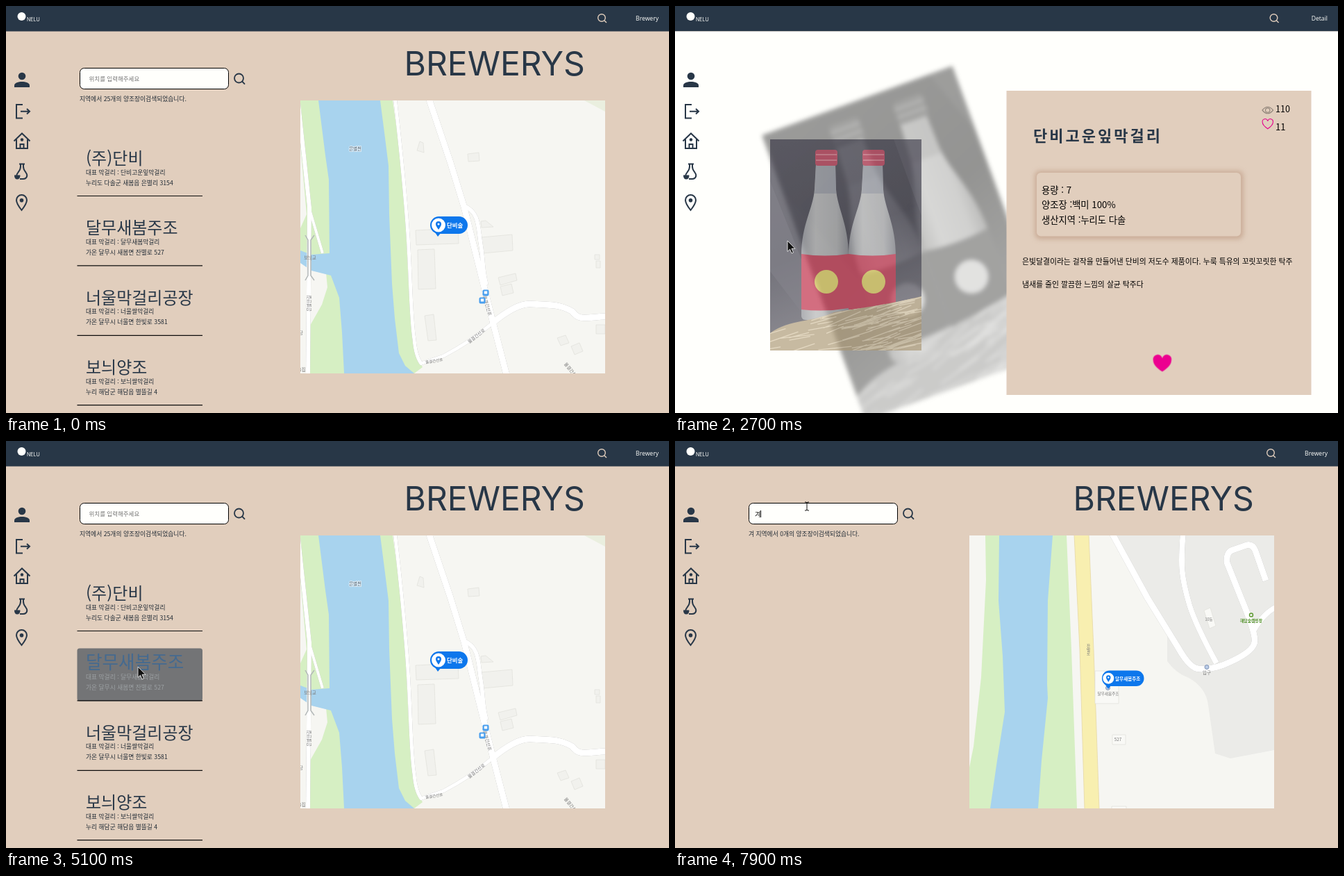
Recreate the animation shown at these times as an HTML page. Size 955 by 586 pixels, loop 8 s.

```html
<!DOCTYPE html>
<html lang="ko">
<head>
<meta charset="utf-8">
<title>Brewery</title>
<style>
@property --h { syntax: "<number>"; inherits: true; initial-value: 0; }
html, body { margin: 0; width: 100%; height: 100%; overflow: hidden; background: #e1cebd; }
svg { display: block; }
text { font-family: "Noto Sans CJK KR", "Noto Sans CJK", sans-serif; white-space: pre; }
.anim { animation: 8s step-end infinite; }
.latin { font: 8.6px "Open Sans", sans-serif; fill: #fffffc; text-anchor: end; }
.line { fill: none; stroke: #283747; stroke-width: 2; }
.small { font-size: 8.75px; fill: #222c36; }

/* cards: --h is the hover amount */
.card .bg { fill: #2b3a49; opacity: var(--h); rx: calc(6px * var(--h)); }
.card .name { font-size: calc(24px + 2.7px * var(--h)); fill: color-mix(in srgb, #568cc0 calc(var(--h) * 100%), #283747); }
.card .sub { font-size: 8.75px; fill: color-mix(in srgb, #fffffc calc(var(--h) * 92%), #222c36); }
#c1 { animation-name: hover1; }
#c2 { animation-name: hover2; }
@keyframes hover1 {
  0% { --h: 0; }
  7.5% { --h: 0; animation-timing-function: steps(4); }
  12.5% { --h: 1; }
  21.25%, 75% { --h: 0; }
  76.25% { --h: .1; animation-timing-function: steps(4); }
  81.25% { --h: 1; }
  82.5% { --h: 1; animation-timing-function: steps(5); }
  88.75%, 100% { --h: 0; }
}
@keyframes hover2 {
  0% { --h: 0; }
  60% { --h: 0; animation-timing-function: steps(5); }
  66.25%, 75% { --h: 1; }
  76.25% { --h: .88; animation-timing-function: steps(4); }
  81.25%, 100% { --h: 0; }
}

/* page states */
#list { animation-name: list; }
#map { animation-name: map; }
#map2 { animation-name: map2; }
#detail { animation-name: detail; }
.late { animation-name: late; }
#hint { animation-name: hint; }
#caret { animation-name: caret; }
#key1 { animation-name: key1; }
#key2 { animation-name: key2; }
#n1 { animation-name: n1; }
#n2 { animation-name: n2; }
#n3 { animation-name: n3; }
#n4 { animation-name: n4; }
@keyframes list { 0%, 52.5% { visibility: visible; } 46.25%, 98.75%, 100% { visibility: hidden; } }
@keyframes map { 0%, 52.5%, 100% { opacity: 1; } 46.25% { opacity: 0; } }
@keyframes map2 { 0% { visibility: hidden; } 68.75%, 100% { visibility: visible; } }
@keyframes detail { 0%, 46.25%, 100% { opacity: 0; } 21.25% { opacity: 1; } }
@keyframes late { 0% { visibility: hidden; } 23.75%, 100% { visibility: visible; } }
@keyframes hint { 0% { visibility: visible; } 92.5%, 100% { visibility: hidden; } }
@keyframes caret { 0% { visibility: hidden; } 92.5%, 100% { visibility: visible; } }
@keyframes key1 { 0%, 97.5%, 100% { visibility: hidden; } 92.5% { visibility: visible; } }
@keyframes key2 { 0% { visibility: hidden; } 97.5%, 100% { visibility: visible; } }
@keyframes n1 { 0%, 52.5% { visibility: visible; } 46.25%, 93.75%, 100% { visibility: hidden; } }
@keyframes n2 { 0%, 52.5%, 100% { visibility: hidden; } 46.25% { visibility: visible; } }
@keyframes n3 { 0%, 98.75%, 100% { visibility: hidden; } 93.75% { visibility: visible; } }
@keyframes n4 { 0% { visibility: hidden; } 98.75%, 100% { visibility: visible; } }

/* detail page */
#info { animation-name: info; }
#stats { animation-name: stats; }
#photo { animation-name: photo; }
#backdrop { filter: grayscale(1) blur(3px); opacity: .5; }
#glow { filter: blur(3px); }
@keyframes info { 0% { transform: none; } 23.75%, 100% { transform: translateY(21.5px); } }
@keyframes stats { 0% { transform: none; } 23.75%, 100% { transform: translateX(-20px); } }
@keyframes photo {
  0% { opacity: 0; transform: translateX(-60px); }
  23.75% { opacity: 0; transform: translateX(-60px); animation-timing-function: steps(8); }
  33.75% { opacity: .66; transform: translateX(-3px); animation-timing-function: steps(3); }
  37.5% { opacity: .85; transform: translateX(5px); animation-timing-function: steps(4); }
  42.5%, 100% { opacity: 1; transform: none; }
}

/* link bars and pointers */
#bar1 { animation-name: bar1; }
#bar2 { animation-name: bar2; }
#arrow { animation-name: arrow; }
#beam { animation-name: beam; }
@keyframes bar1 { 0%, 23.75%, 100% { visibility: hidden; } 15% { visibility: visible; } }
@keyframes bar2 {
  0%, 52.5%, 100% { opacity: 0; }
  41.25% { opacity: 1; }
  48.75% { opacity: .9; animation-timing-function: steps(3); }
  52.4% { opacity: .3; }
}
@keyframes arrow {
  0% { transform: translate(83px, -40px); }
  6.25% { transform: translate(83px, 28px); animation-timing-function: steps(5); }
  12.5% { transform: translate(150px, 235px); }
  15% { transform: translate(148px, 231px); animation-timing-function: steps(3); }
  18.75% { transform: translate(152px, 222px); }
  21.25% { transform: translate(157px, 297px); }
  23.75% { transform: translate(157px, 297px); animation-timing-function: steps(8); }
  33.75% { transform: translate(162px, 338px); }
  35% { transform: translate(162px, 338px); animation-timing-function: steps(5); }
  41.25% { transform: translate(66px, -22px); }
  57.5% { transform: translate(200px, 194px); animation-timing-function: steps(5); }
  63.75% { transform: translate(190px, 325px); }
  68.75% { transform: translate(188px, 326px); animation-timing-function: steps(6); }
  76.25% { transform: translate(182px, 260px); animation-timing-function: steps(2); }
  78.75% { transform: translate(182px, 250px); }
  80% { transform: translate(182px, 250px); animation-timing-function: steps(5); }
  86.25% { transform: translate(188px, 132px); }
  87.5%, 100% { transform: translate(0, -40px); }
}
@keyframes beam {
  0% { transform: translate(0, -40px); }
  87.5% { transform: translate(189px, 114px); animation-timing-function: steps(2); }
  90%, 100% { transform: translate(190px, 94px); }
}

/* maps */
.road { fill: none; stroke: #fff; filter: drop-shadow(0 0 .6px #aaa); }
.house { fill: #f1f1ed; stroke: #e0e0da; stroke-width: .7; }
.tag { font-size: 6.4px; fill: #777; text-anchor: middle; }
.pin { font-weight: 700; fill: #fff; }
</style>
</head>
<body>
<svg width="955" height="586" viewBox="0 0 955 586">
  <defs>
    <path id="heart" d="M12 21C4.500 16 1 12 1 7.300A5.600 5.600 0 0 1 12 4.800A5.600 5.600 0 0 1 23 7.300C23 12 19.500 16 12 21Z"/>
    <g id="lens" fill="none"><circle r="5.300"/><path d="M3.900 3.900L7 7"/></g>
    <g id="drop"><circle r="10" fill="#fff"/><path d="M0 6.500C-3 2-4 .5-4-1.500a4 4 0 0 1 8 0C4 .5 3 2 0 6.500Z" fill="#0d77ec"/><circle cy="-1.500" r="1.500" fill="#fff"/></g>
    <g id="bus"><rect x="-4.500" y="-4.500" width="9" height="9" rx="2" fill="#4a9fee"/><path d="M-2.200-2.500h4.400v4h-4.400Z" fill="#fff"/></g>
    <linearGradient id="cloth" x2=".3" y2="1"><stop stop-color="#3a3846"/><stop offset=".55" stop-color="#2b2a38"/><stop offset="1" stop-color="#585661"/></linearGradient>
    <linearGradient id="glass"><stop stop-color="#85878f"/><stop offset=".3" stop-color="#b0b1b2"/><stop offset=".75" stop-color="#a3a4a7"/><stop offset="1" stop-color="#777982"/></linearGradient>
    <g id="bottle">
      <path d="M-13 36L-15 72C-17 100-34 122-34 168V255Q-33 260-28 260H28Q33 260 34 255V168C34 122 18 100 16 72L15 36Z" fill="url(#glass)"/>
      <path d="M-13 36L-15 78H16L15 36Z" fill="#777c8e" opacity=".55"/>
      <rect x="-14" y="15" width="32" height="23" rx="4" fill="#b32c4a"/>
      <path d="M-13 22H17M-13 30H17" stroke="#d8798a" stroke-width="1.500"/>
      <path d="M-34 165Q0 170 34 165V243Q0 249-34 245Z" fill="#bd2440"/>
      <circle cx="2" cy="205" r="17" fill="#dccb55"/>
    </g>
    <clipPath id="pile"><path d="M0 279C30 258 60 264 92 249L150 240Q190 233 218 226V304H0Z"/></clipPath>
    <symbol id="scene" viewBox="0 0 218 304" preserveAspectRatio="xMinYMin slice">
      <rect width="218" height="304" fill="url(#cloth)"/>
      <path d="M0 60L46 175V250L0 190ZM178 0H218V110Z" fill="#4a4856" opacity=".5"/>
      <use href="#bottle" x="79"/><use href="#bottle" x="147"/>
      <g clip-path="url(#pile)"><rect width="218" height="304" fill="#ab9673"/><path id="straw" fill="none" stroke="#d6c6a5" stroke-width="1.300"/></g>
    </symbol>
  </defs>

  <rect width="955" height="586" fill="#e1cebd"/>
  <rect width="955" height="36.500" fill="#283747"/>
  <circle cx="22.500" cy="15" r="6" fill="#fffffc"/>
  <text x="30" y="22" style="font:7px Inter,sans-serif" fill="#fffffc">NELU</text>

  <g id="brewery">
    <use href="#lens" x="858" y="17" stroke="#e1cebd" stroke-width="1.400"/>
    <text class="latin" x="940" y="20.500">Brewery</text>
    <text x="573.500" y="100" style="font:48px Inter,sans-serif" fill="#283747">BREWERYS</text>
    <rect x="106.500" y="89.500" width="214" height="30" rx="6" fill="#fffffc" stroke="#000"/>
    <use href="#lens" transform="translate(335.500 104) scale(1.220)" stroke="#283747" stroke-width="1.500"/>
    <text id="hint" class="anim" x="119.500" y="108" font-size="8.500" fill="#757575">위치를 입력해주세요</text>
    <text id="key1" class="anim" x="115" y="108.500" font-size="9">ㄱ</text>
    <text id="key2" class="anim" x="115" y="108.500" font-size="9">겨</text>
    <path id="caret" class="anim" d="M123.500 100V110" stroke="#000"/>
    <text id="n1" class="anim small" x="106" y="137">지역에서 25개의 양조장이검색되었습니다.</text>
    <text id="n2" class="anim small" x="106" y="137">지역에서 0개의 양조장이검색되었습니다.</text>
    <text id="n3" class="anim small" x="106" y="137">ㄱ 지역에서 25개의 양조장이검색되었습니다.</text>
    <text id="n4" class="anim small" x="106" y="137">겨 지역에서 0개의 양조장이검색되었습니다.</text>
    <g id="list" class="anim"></g>

    <g id="map" class="anim">
      <svg x="424" y="136" width="439" height="393" viewBox="424 136 439 393">
        <rect x="424" y="136" width="439" height="393" fill="#f6f6f2"/>
        <path d="M424 136H557L566 200 575 300 580 400 585 470 592 505 600 520 588 529H438V460L455 430 463 405 461 384 424 368V320L433 300 424 200Z" fill="#d6efc3"/>
        <path d="M450 136H539L546 190 551 230 552 300 556 400 560 450 566 500 575 518 588 529H487L484 470 480 420 468 388 440 381 424 370V352L440 358 466 356 465 250 460 215Z" fill="#a8d3ee"/>
        <path d="M833 136L863 152V136Z" fill="#eaefdf"/>
        <g class="house">
          <path d="M590 323L651 320 652 342 591 344ZM593 351L617 350 619 407 594 408ZM603 446L616 444 620 481 608 482ZM665 213L681 211 682 223 666 224ZM592 208L596 195 601 197 602 211ZM685 333L729 329 730 352 687 356ZM684 310L691 309 702 318 685 319ZM709 391L734 385 736 395 712 402ZM712 404L728 400 731 413 715 417ZM848 358H855V365H848ZM850 367H856V377H850ZM794 478L806 474 811 485 799 489ZM814 490L826 485 831 497 819 502ZM850 459H863V472H850Z"/>
        </g>
        <g class="road" stroke-width="9">
          <path d="M608 130L640 225 660 290 700 450 722 535"/>
          <path d="M700 457Q735 428 755 429C785 430 800 430 816 440C826 455 840 447 866 447"/>
          <path d="M660 288C682 296 680 320 684 345S686 380 692 402" stroke-width="6"/>
          <path d="M700 457Q670 483 630 504L597 515" stroke-width="5"/>
          <path d="M560 130C568 200 575 270 579 330S583 450 588 480Q590 505 599 516" stroke-width="5"/>
          <path d="M421 140Q432 240 437 290L435 535" stroke-width="6"/>
          <path d="M437 292L456 356" stroke-width="4"/>
        </g>
        <path d="M431 330L435 337V388L431 395M444 330L439 337V388L444 395" fill="none" stroke="#b3b8b8" stroke-width="1.500"/>
        <g class="tag">
          <text x="503" y="207.500" fill="#456" stroke="#e8f4fb" stroke-width="1.500" paint-order="stroke">은별천</text>
          <text x="438" y="364.500">보늬교</text>
          <text transform="translate(438.500 428) rotate(-90)">은별안길</text>
          <text x="425" y="473">당</text><text x="427" y="526">1집</text>
          <text transform="translate(679 477) rotate(-38)">물결간선로</text>
          <text transform="translate(617 513) rotate(-9)" font-size="5.500">물결간선로</text>
          <text transform="translate(691 432) rotate(74)">물결간선로</text>
          <text transform="translate(813 527) rotate(50)">물결간선로</text>
        </g>
        <use href="#bus" x="691" y="413"/><use href="#bus" x="686" y="424"/>
        <path d="M618 326H627L622 332Z" fill="#0d77ec"/>
        <rect x="611" y="303" width="54" height="25" rx="12.500" fill="#0d77ec"/>
        <use href="#drop" x="623" y="315.500"/>
        <text class="pin" x="635" y="318.700" font-size="8.400">단비술</text>

        <g id="map2" class="anim">
          <rect x="424" y="136" width="439" height="393" fill="#f6f6f2"/>
          <path d="M447 136H564L571 300 579 529H424V470L430 440 441 340 448 200Z" fill="#d6efc3"/>
          <path d="M467 136H544L537 230 536 350 537 370 528 460 523 529H454L464 460 475 390 472 310 466 230Z" fill="#a8d3ee"/>
          <path d="M575 135H596L603 300 611 530H590L583 300Z" fill="#f8efb0" stroke="#e6d8a6" stroke-width=".8"/>
          <path d="M630 136L709 280V317Q722 335 740 341 765 355 768 380L778 450 800 457 863 445V136Z" fill="#ebebe8"/>
          <g class="road" stroke-width="9">
            <path d="M628 130L680 225 725 298Q742 328 755 328 775 330 800 318 835 302 835 288 836 275 815 225L795 175Q794 160 803 157L823 150Q832 148 836 158L851 201"/>
            <path d="M732 130C728 180 729 195 741 236Q750 265 780 320" stroke-width="8"/>
            <path d="M834 272Q848 248 866 239" stroke-width="8"/>
          </g>
          <g class="house">
            <path d="M762 244L771 240 779 266 770 270ZM605 331H639V378H605ZM630 423H649V437H630ZM629 526H650V533H629Z" fill="#f9f9f6"/>
          </g>
          <g class="tag">
            <text x="769" y="259" font-size="5.500">10동</text>
            <text x="638" y="432">527</text>
            <text x="766" y="335.500">입구</text>
            <text x="624" y="366" font-size="5.600">달무새봄주조</text>
            <text x="595.500" y="297" font-size="5.500">잔</text><text x="595.500" y="302.500" font-size="5.500">별</text><text x="595.500" y="308" font-size="5.500">로</text>
            <text x="830" y="261" font-weight="700" font-size="5.800" style="fill:#4f8f25">해담숲캠핑장</text>
          </g>
          <circle cx="830" cy="250.500" r="2.500" fill="none" stroke="#5c9a30" stroke-width="1.400"/>
          <g fill="#b9cbe6" stroke="#7f93b5"><circle cx="766" cy="325.500" r="3"/><circle cx="623.500" cy="355.500" r="3"/></g>
          <path d="M620 351H629L624 357Z" fill="#0d77ec"/>
          <rect x="615" y="330.500" width="60.500" height="22.500" rx="11" fill="#0d77ec"/>
          <use href="#drop" transform="translate(624.300 341.700) scale(.8)"/>
          <text class="pin" x="634" y="344.500" font-size="6.600">달무새봄주조</text>
        </g>
      </svg>
    </g>
  </g>

  <g id="detail" class="anim">
    <path d="M845 5H950V30H845Z" fill="#283747"/>
    <use href="#lens" x="862.500" y="17" stroke="#e1cebd" stroke-width="1.400"/>
    <text class="latin" x="940" y="20.500">Detail</text>
    <rect y="36.500" width="955" height="549.500" fill="#fffffc"/>
    <g class="anim late"><g id="backdrop"><use href="#scene" width="292" height="437" transform="translate(125 186) rotate(-20)"/></g></g>
    <g id="photo" class="anim"><use href="#scene" x="140" y="192" width="218" height="304"/></g>
    <rect x="477.500" y="122" width="439" height="438" fill="#e1cebd"/>
    <g id="stats" class="anim" fill="none">
      <g stroke="#93877c" stroke-width="1.200"><path d="M866 150Q873.700 140.500 881.500 150 873.700 159.500 866 150Z"/><circle cx="873.700" cy="150" r="3.200"/></g>
      <use href="#heart" transform="translate(865.500 162.300) scale(.69)" stroke="#e4008c" stroke-width="1.600"/>
    </g>
    <g class="anim late">
      <text x="865" y="153" font-size="12.500">110</text>
      <text x="865" y="179" font-size="13">11</text>
      <text x="516" y="194.500" font-size="22" font-weight="700" letter-spacing="3" fill="#283747">단비고운잎막걸리</text>
      <text font-size="10.850" x="500" y="371.500">은빛달결이라는 걸작을 만들어낸 단비의 저도수 제품이다. 누룩 특유의 꼬릿꼬릿한 탁주</text>
      <text font-size="10.850" x="500" y="404.500">냄새를 줄인 깔끔한 느낌의 살균 탁주다</text>
    </g>
    <g id="info" class="anim" font-size="13.300">
      <rect id="glow" x="518" y="215.500" width="301" height="99" rx="8" fill="#cbae99"/>
      <rect x="521" y="218.500" width="294" height="91.500" rx="6" fill="#e1cebd"/>
      <text x="528" y="248">용량 :<tspan class="anim late"> 7</tspan></text>
      <text x="528" y="269.700">양조장 :<tspan class="anim late">백미 100%</tspan></text>
      <text x="528" y="291.400">생산지역 :<tspan class="anim late">누리도 다솔</tspan></text>
      <use href="#heart" transform="translate(687.600 479.900) scale(1.190)" fill="#ec0090"/>
    </g>
  </g>

  <g id="sidebar" fill="#283747">
    <circle cx="23" cy="101" r="5.300"/><path d="M12 117V114.500C12 110.500 18 109 23 109S34 110.500 34 114.500V117Z"/>
    <g class="line">
      <path d="M24 142H15V161.500H24M21 151.700H33M30 148L34 151.700 30 155.500"/>
      <path d="M11.500 194.500L23 183.500 34.500 194.500M15 192V205H31V192M20.500 205V199H25.500V205"/>
      <path d="M19 227.500H27M21 228C21.500 234 20 236 17.500 239.500 15.500 242 15 243 15.500 245M25 228C24.500 234 26 236 28.500 239.500 32 244 30 249 25 249H20"/>
      <path d="M22.500 294C17 287 15 283 15 279.500A7.500 7.500 0 0 1 30 279.500C30 283 28 287 22.500 294Z"/>
    </g>
    <circle cx="23" cy="192.500" r="2.200"/><path d="M12 243.500H20.500Q20.500 249.500 16.200 249.500T12 243.500Z"/><circle cx="22.500" cy="279.700" r="2.800"/>
  </g>

  <g id="bar1" class="anim">
    <path d="M0 581.500H318Q321.500 582 321.500 586H0Z" fill="#dadbdd"/>
    <text x="212" y="592.500" font-size="9" fill="#555">단비고운잎막걸리</text>
  </g>
  <path id="bar2" class="anim" d="M0 581.500H99Q102 582 102 586H0Z" fill="#dfe0e6"/>
  <path id="arrow" class="anim" d="M0 0V15.500L3.500 12.200 6 18 8.500 17 6 11.300H11Z" fill="#111" stroke="#fff" stroke-width=".8"/>
  <path id="beam" class="anim" d="M-3-6H-1L0-5 1-6H3M0-5V5M-3 6H-1L0 5 1 6H3" fill="none" stroke="#111"/>
</svg>
<script>
const cards = [
  ["(주)단비", "단비고운잎막걸리", "누리도 다솔군 새봄읍 은별리 3154"],
  ["달무새봄주조", "달무새봄막걸리", "가온 달무시 새봄면 잔별로 527"],
  ["너울막걸리공장", "너울쌀막걸리", "가온 달무시 너울면 한빛로 3581"],
  ["보늬양조", "보늬쌀막걸리", "누리 해담군 해담읍 별뜰길 4"],
];
document.getElementById("list").innerHTML = cards.map(([name, drink, place], i) => `
  <g id="c${i + 1}" class="card anim" transform="translate(102.5 ${198 + i * 100.4})">
    <rect class="bg" width="180.5" height="76"/>
    <path d="M0 75.5H180.5" stroke="#0c0c0c" stroke-width="1.2"/>
    <text class="name" x="12.5" y="30">${name}</text>
    <text class="sub" x="12.5" y="44.5">대표 막걸리 : ${drink}</text>
    <text class="sub" x="12.5" y="59.5">${place}</text>
  </g>`).join("");

// seeded straw strands
let seed = 7;
const rand = () => (seed = seed * 16807 % 2147483647) / 2147483647;
let strands = "";
for (let i = 0; i < 110; i++) {
  const x = rand() * 210 - 15, y = 235 + rand() * 75, len = 20 + rand() * 35;
  strands += `M${x} ${y}l${len} ${-len * (0.1 + rand() * 0.35)}`;
}
document.getElementById("straw").setAttribute("d", strands);
</script>
</body>
</html>
```
